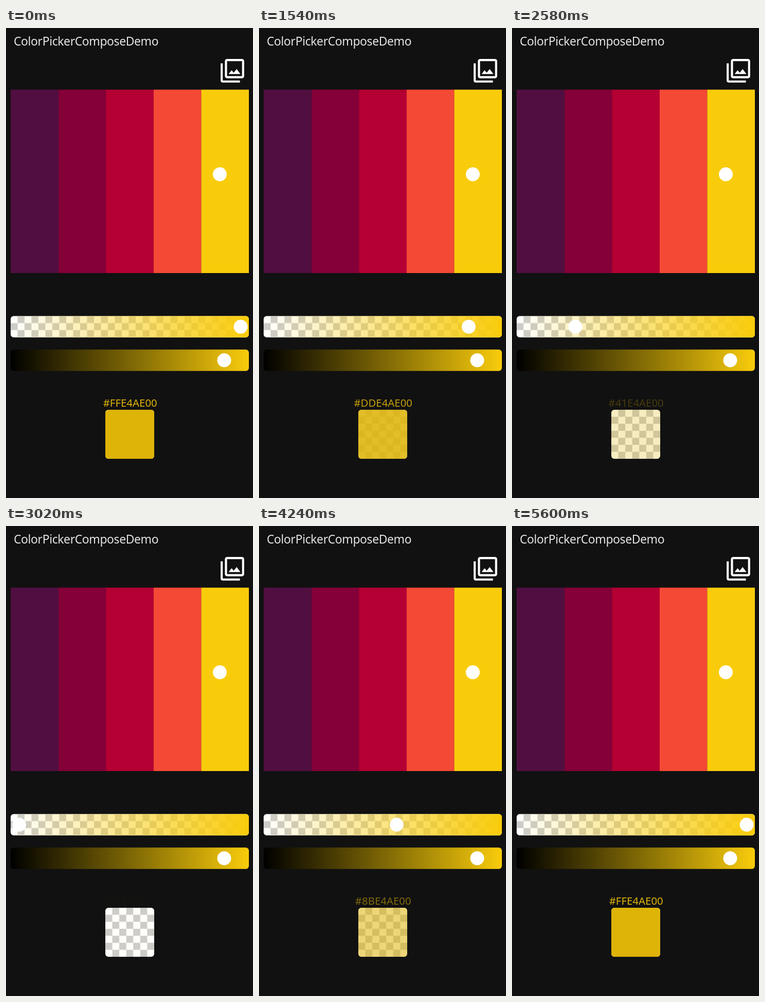
Write an HTML page that moves like this. It is 480x911 px and loops after 5700 ms.

```html
<!DOCTYPE html>
<html lang="en">
<head>
<meta charset="utf-8">
<title>ColorPickerComposeDemo</title>
<style>
  html, body { margin: 0; width: 100%; height: 100%; overflow: hidden; background: #111; }
  svg { display: block; width: 100%; height: 100%; }
  text { font-family: "Noto Sans", "Open Sans", sans-serif; }
  .title { font-size: 23px; letter-spacing: -.43px; fill: #e4e4e4; }
  .label { font-size: 20.4px; font-weight: 500; text-anchor: middle; fill: #deb408; }
</style>
</head>
<body>
<svg viewBox="0 0 480 911">
  <defs>
    <pattern id="trackCheck" x="9" y="558.5" width="27" height="27" patternUnits="userSpaceOnUse">
      <path fill="#fff" d="M0 0h27v27H0z"/>
      <path fill="#ccc" d="M13.5 0H27v13.5H13.5zM0 13.5h13.5V27H0z"/>
    </pattern>
    <pattern id="swatchCheck" x="193" y="740" width="27.14" height="27.14" patternUnits="userSpaceOnUse">
      <path fill="#fff" d="M0 0h27.14v27.14H0z"/>
      <path fill="#ccc" d="M13.57 0h13.57v13.57H13.57zM0 13.57h13.57v13.57H0z"/>
    </pattern>
    <linearGradient id="fade">
      <stop stop-color="#f9cc0b" stop-opacity="0"/>
      <stop offset="1" stop-color="#f9cc0b"/>
    </linearGradient>
    <linearGradient id="shade">
      <stop stop-color="#000"/>
      <stop offset="1" stop-color="#f9cc0b"/>
    </linearGradient>
  </defs>

  <text class="title" x="15" y="34">ColorPickerComposeDemo</text>

  <path fill="#fff" transform="translate(415 58) scale(2.08)" d="M3 5H1v16c0 1.1.9 2 2 2h16v-2H3V5zm18-4H7c-1.1 0-2 .9-2 2v14c0 1.1.9 2 2 2h14c1.1 0 2-.9 2-2V3c0-1.1-.9-2-2-2zm0 16H7V3h14v14zM15.96 10.29l-2.75 3.54-1.96-2.36L8.5 15h11z"/>

  <g transform="translate(0 119.5)">
    <path fill="#510e40" d="M9 0h93.5v355.5H9z"/>
    <path fill="#850038" d="M102.3 0h92.2v355.5h-92.2z"/>
    <path fill="#b40033" d="M194.3 0h93v355.5h-93z"/>
    <path fill="#f34935" d="M287 0h92.7v355.5H287z"/>
    <path fill="#f9cc0b" d="M379.5 0H472v355.5h-92.5z"/>
  </g>
  <circle cx="415.5" cy="283.5" r="13.5" fill="#fff"/>

  <rect x="9" y="558.3" width="463" height="41.5" rx="6" fill="url(#trackCheck)"/>
  <rect x="9" y="558.3" width="463" height="41.5" rx="6" fill="url(#fade)"/>
  <circle id="thumb" cx="456" cy="579" r="13.5" fill="#fff"/>

  <rect x="9" y="623.3" width="463" height="41.5" rx="6" fill="url(#shade)"/>
  <circle cx="424" cy="644" r="13.5" fill="#fff"/>

  <text class="label" id="label" x="241.2" y="734">#FFE4AE00</text>
  <rect x="193" y="740" width="95" height="95" rx="6" fill="url(#swatchCheck)"/>
  <rect id="swatch" x="193" y="740" width="95" height="95" rx="6" fill="#deb408"/>
</svg>
<script>
  const LOOP = 5700, STEP = 20, LEFT = 9, WIDTH = 463;

  // Finger position along the alpha track: [ms, x]
  const drag = [
    [1110, 466], [1540, 407.5], [2060, 280.5], [2580, 123], [3120, 9], [3240, 9],
    [3420, 29], [3600, 76.5], [4240, 267.5], [4900, 445], [5080, 472]
  ];

  const clamp = (v, lo, hi) => Math.min(hi, Math.max(lo, v));
  const slope = i => (drag[i + 1][1] - drag[i][1]) / (drag[i + 1][0] - drag[i][0]);

  // Harmonic mean of neighbouring slopes keeps the curve monotone
  function tangent(i) {
    if (i === 0 || i === drag.length - 1) return 0;
    const a = slope(i - 1), b = slope(i);
    return a * b > 0 ? 2 * a * b / (a + b) : 0;
  }

  function fingerAt(t) {
    if (t <= drag[0][0] || t >= drag[drag.length - 1][0]) return LEFT + WIDTH;
    const i = drag.findIndex(k => k[0] > t) - 1;
    const [t0, x0] = drag[i], [t1, x1] = drag[i + 1];
    const h = t1 - t0, u = (t - t0) / h, v = 1 - u;
    return x0 * (1 + 2 * u) * v * v + x1 * u * u * (3 - 2 * u)
      + h * u * v * (tangent(i) * v - tangent(i + 1) * u);
  }

  const [thumb, label, swatch] = ["thumb", "label", "swatch"].map(id => document.getElementById(id));
  const start = performance.now();

  function draw(now) {
    const t = Math.floor(Math.max(0, now - start) % LOOP / STEP) * STEP;
    // The colour readout trails the thumb by one step
    const alpha = Math.floor(clamp((fingerAt(t - STEP) - LEFT) / WIDTH, 0, 1) * 255);
    thumb.setAttribute("cx", clamp(fingerAt(t), 25.5, 456).toFixed(2));
    label.textContent = "#" + alpha.toString(16).toUpperCase().padStart(2, "0") + "E4AE00";
    label.setAttribute("fill-opacity", alpha / 255);
    swatch.setAttribute("fill-opacity", alpha / 255);
    requestAnimationFrame(draw);
  }
  draw(start);
</script>
</body>
</html>
```
